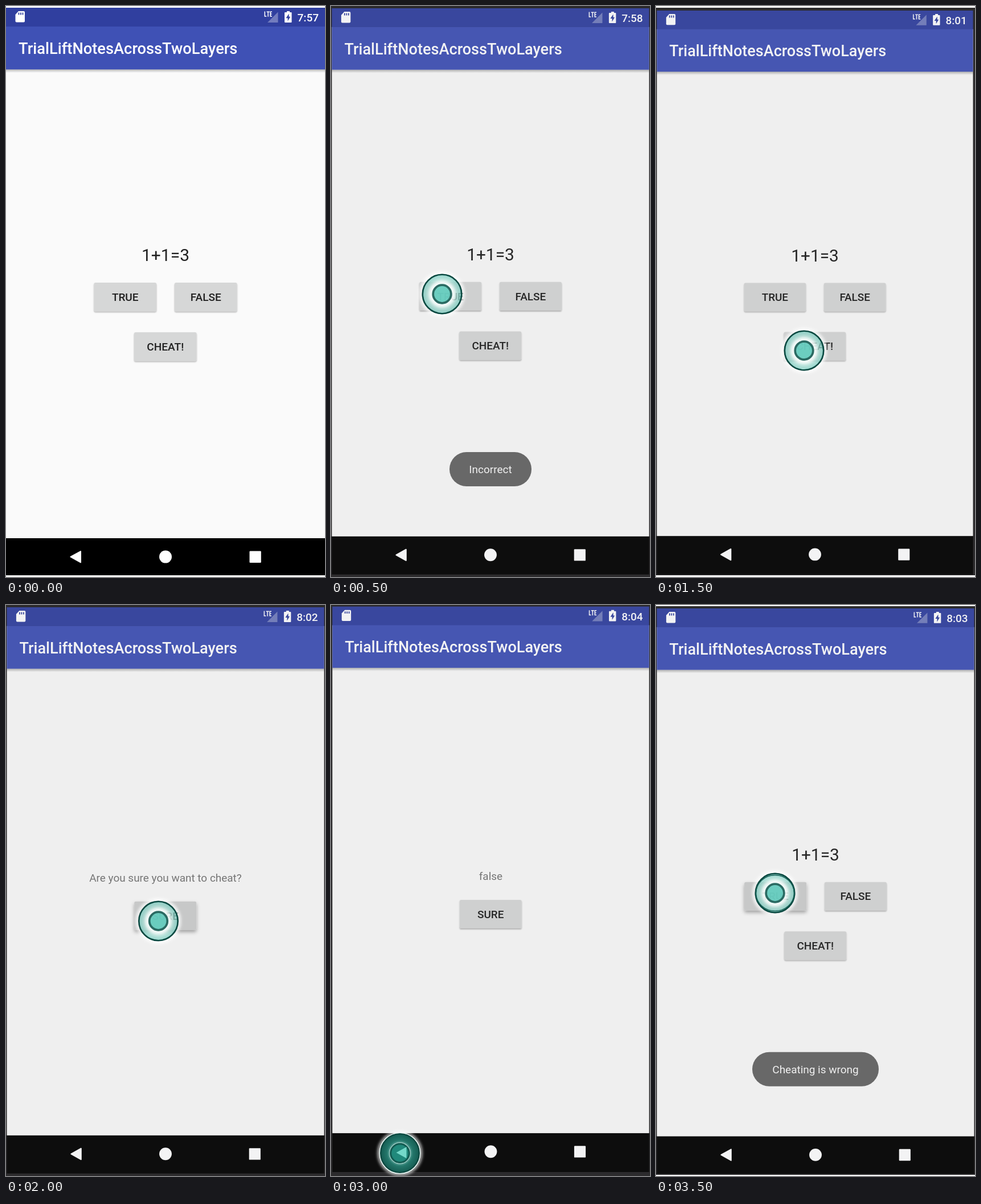
Animation of 560 by 1001 pixels, one loop 4 s. Source, as an HTML page:

```html
<!DOCTYPE html>
<html lang="en">
<head>
<meta charset="utf-8">
<title>Quiz app</title>
<style>
html, body { margin: 0; width: 100%; height: 100%; overflow: hidden; background: #fff; }
svg { display: block; width: 560px; height: 1001px; font-family: Roboto, sans-serif; }
.med { font-weight: 500; }
</style>
</head>
<body>
<svg viewBox="0 0 560 1001" xmlns="http://www.w3.org/2000/svg">
  <defs>
    <linearGradient id="drop" x1="0" y1="0" x2="0" y2="1">
      <stop offset="0" stop-color="#000" stop-opacity=".27"/>
      <stop offset="1" stop-color="#000" stop-opacity="0"/>
    </linearGradient>
    <radialGradient id="lightFill">
      <stop offset=".48" stop-color="#f2fffc" stop-opacity=".8"/>
      <stop offset=".7" stop-color="#b2e3da" stop-opacity=".72"/>
      <stop offset="1" stop-color="#6fcabc" stop-opacity=".72"/>
    </radialGradient>
    <radialGradient id="darkFill">
      <stop offset=".48" stop-color="#6fb5ab"/>
      <stop offset=".66" stop-color="#24776b"/>
      <stop offset="1" stop-color="#145b51"/>
    </radialGradient>
    <filter id="low" x="-10%" y="-20%" width="120%" height="140%">
      <feDropShadow dx="0" dy="1.6" stdDeviation="1.3" flood-opacity=".33"/>
    </filter>
    <filter id="high" x="-10%" y="-30%" width="120%" height="170%">
      <feDropShadow dx="0" dy="3.5" stdDeviation="3" flood-opacity=".34"/>
    </filter>
    <filter id="blur" x="-30%" y="-30%" width="160%" height="160%">
      <feGaussianBlur stdDeviation="2.4"/>
    </filter>
  </defs>
  <g id="stage"></g>
</svg>
<script>
const STEP = 500;
const TITLE = 'TrialLiftNotesAcrossTwoLayers';
const bright = { status: '#303f9f', bar: '#3f51b5', bg: '#fafafa', button: '#d6d7d7',
  held: '#c8c9c9', nav: '#000', white: '#fff', ink: '#212121', soft: '#757575' };
const dim = { status: '#39479e', bar: '#4656b2', bg: '#efefef', button: '#cfd0d0',
  held: '#c7c8c8', nav: '#0d0d0d', white: '#f3f3f4', ink: '#262626', soft: '#757575' };

// Screen placement: x, y, horizontal and vertical scale, navigation bar end, dark frame top and bottom
const full = [0, 3, 1, 1, 998, 0, 0];
const wide = [1.5, 4, .9946, .9955, 996.5, 0, 1001];
const low = [1.5, 8, .9911, .9905, 996.5, 3, 998];
const high = [2.4, 2.7, .993, .9927, 994, 0, 1001];
const mid = [1.5, 6, .9946, .9951, 997, 2, 999];

const scenes = [
  { time: '7:57', view: full },
  { time: '7:58', view: wide, tap: [195, 505], toast: ['Incorrect', 144.8] },
  { time: '7:59', view: wide, tap: [350, 505], toast: ['Correct', 131] },
  { time: '8:01', view: low, tap: [260, 604] },
  { time: '8:02', view: wide, tap: [267.5, 554], answer: 'Are you sure you want to cheat?', held: 'SURE' },
  { time: '8:02', view: wide, tap: [267.5, 554], answer: 'false' },
  { time: '8:04', view: high, tap: [121, 961], answer: 'false', dark: true },
  { time: '8:03', view: mid, tap: [209, 505], toast: ['Cheating is wrong', 223.2], held: 'TRUE', echo: true }
];

const rect = (x, y, w, h, fill, more = '') =>
  `<rect x="${x}" y="${y}" width="${w}" height="${h}" fill="${fill}" ${more}/>`;
const path = (d, fill, more = '') => `<path d="${d}" fill="${fill}" ${more}/>`;
const circle = (r, fill, more = '') => `<circle r="${r}" fill="${fill}" ${more}/>`;
const text = (s, x, y, size, fill, more = 'text-anchor="middle"') =>
  `<text x="${x}" y="${y}" font-size="${size}" fill="${fill}" ${more}>${s}</text>`;

function statusBar(time, c) {
  return rect(0, 3, 560, 33, c.status) +
    path('M22 9H31Q33 9 33 11V26.5Q33 28.5 31 28.5H18.5Q16.5 28.5 16.5 26.5V15Z', c.white) +
    path('M22.5 11.5V15.5M26 11.5V15.5M29.5 11.5V15.5', 'none', `stroke="${c.status}" stroke-width="1.8"`) +
    path('M454.3 9.5V18H457.3M457.6 10.2H462.6M460.1 10.2V18.7M467 10.2H464.1V18H467M464.1 14H466.6',
      'none', `stroke="${c.white}" stroke-width="1.5"`) +
    path('M459 29L477.5 10.5V29Z', c.white, 'opacity=".32"') +
    path('M493 9H498V11H500.5Q501.5 11 501.5 12V28Q501.5 29 500.5 29H490Q489 29 489 28V12Q489 11 490 11H493Z', c.white) +
    path('M496.6 13.5L491.5 21.2H494.6V26.5L499.2 18.8H496.6Z', c.status) +
    text(time, 549, 27, 19, c.white, 'text-anchor="end" class="med"');
}

function button(label, x, y, s, c) {
  const held = s.held === label;
  return rect(x, y, 109.5, 50.2, held ? c.held : c.button, `rx="2.6" filter="url(#${held ? 'high' : 'low'})"`) +
    text(label, x + 54.75, y + 32, 19.07, c.ink, 'text-anchor="middle" class="med"');
}

function content(s, c) {
  if (s.answer) return text(s.answer, 280, 486, 19.07, c.soft) + button('SURE', 225, 521, s, c);
  return text('1+1=3', 280, 447, 30, c.ink) +
    button('TRUE', 154.5, 485, s, c) + button('FALSE', 296, 485, s, c) + button('CHEAT!', 225, 572, s, c);
}

function toast([label, w]) {
  return rect(280 - w / 2, 784.6, w, 60.2, '#686868', 'rx="30.1"') + text(label, 280, 822, 19.07, '#f0f0f0');
}

function navBar(c) {
  return path('M113.5 965.7L131 956V975.5Z', c.white, `stroke="${c.white}" stroke-width="2" stroke-linejoin="round"`) +
    `<g transform="translate(280 965.6)">${circle(11, c.white)}</g>` +
    rect(427.5, 955.5, 20.3, 20.5, c.white, 'rx="1.2"');
}

function touch([x, y], dark, echo) {
  const glow = r => circle(r, 'none', `stroke="#fff" stroke-width="5" filter="url(#blur)" opacity="${dark ? .75 : .95}"`);
  let out = glow(37) + circle(34.3, `url(#${dark ? 'darkFill' : 'lightFill'})`);
  if (dark) {
    out += circle(34, 'none', 'stroke="#0b463e" stroke-width="2.5"') +
      circle(35.8, 'none', 'stroke="#e9f7f4" stroke-width="1.6"') +
      circle(18.3, '#20897b', 'stroke="#b9d8d3" stroke-width="1.2"') +
      circle(16.2, 'none', 'stroke="#135c52" stroke-width="3"') +
      path('M-6.5 -1L11.5 -11V9Z', '#74d8c9');
  } else {
    out += glow(20) + circle(34.2, 'none', 'stroke="#07473f" stroke-width="2.6"') +
      circle(15.8, '#4fc4b4', 'fill-opacity=".82" stroke="#2a6a62" stroke-width="3.7"');
  }
  if (echo) out += '<ellipse rx="33.5" ry="31.5" fill="none" stroke="#155f55" stroke-width="1.6"/>';
  return `<g transform="translate(${x} ${y})">${out}</g>`;
}

function draw(s) {
  const [x, y, sx, sy, end, top, bottom] = s.view;
  const c = s.tap ? dim : bright;
  const navTop = y + 930 * sy;
  return rect(0, 0, 560, 1001, '#fff') +
    (bottom ? rect(0, top, 560, bottom - top, '#2c2b2d') : '') +
    rect(x, navTop - 1, 560 * sx, end - navTop + 1, c.nav) +
    `<g transform="translate(${x} ${y - 3 * sy}) scale(${sx} ${sy})">` +
    rect(0, 36, 560, 897, c.bg) + rect(0, 111, 560, 6, 'url(#drop)') +
    rect(0, 35.5, 560, 75.7, c.bar) + statusBar(s.time, c) +
    text(TITLE, 22, 84, 27.24, c.white, 'class="med"') +
    content(s, c) + (s.toast ? toast(s.toast) : '') + navBar(c) + '</g>' +
    (s.tap ? touch(s.tap, s.dark, s.echo) : '');
}

const stage = document.getElementById('stage');
const start = performance.now();
let shown = -1;

function update(now) {
  const i = Math.floor(Math.max(0, now - start) / STEP) % scenes.length;
  if (i !== shown) {
    shown = i;
    stage.innerHTML = draw(scenes[i]);
  }
  requestAnimationFrame(update);
}
update(start);
</script>
</body>
</html>
```
